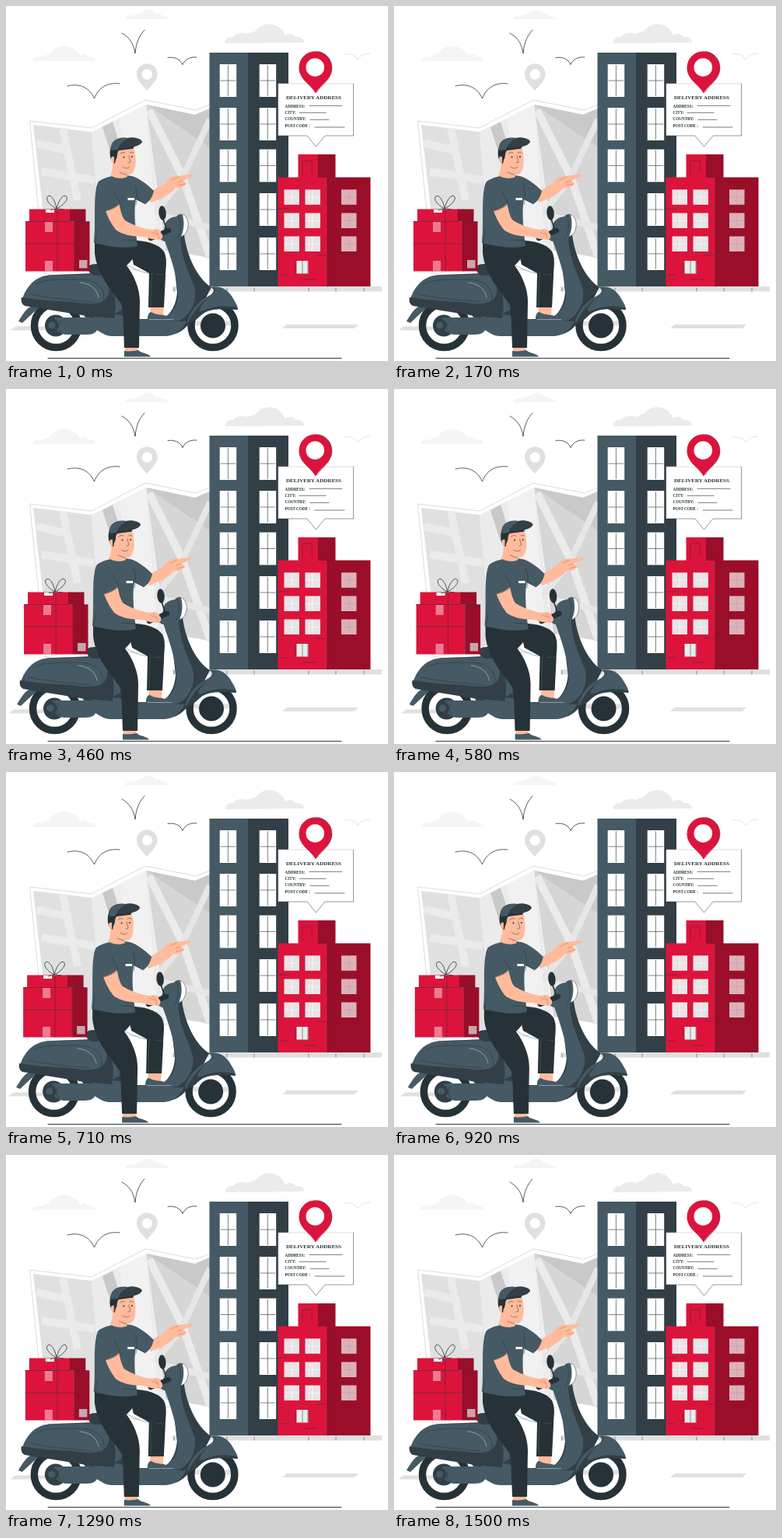
These frames come from a looping animation (491 by 457 pixels, 1.54 s). An HTML page:

```html
<!DOCTYPE html>
<html lang="en">
<head>
<meta charset="utf-8">
<title>Delivery scooter</title>
<style>
  html, body { margin: 0; width: 100%; height: 100%; overflow: hidden; background: #fff; }
  svg { display: block; width: 491px; height: 457px; }
  text { font: bold 5.15px "Liberation Serif", serif; fill: #263238; }
  .slate { fill: #455a64; }
  .deep { fill: #323f47; }
  .ink { fill: #263238; }
  .red { fill: #dc143c; }
  .wine { fill: #9a0e2a; }
  .skin { fill: #ffbb9b; }
  .white { fill: #fff; }
  .grey { fill: #e0e0e0; }
  .pale { fill: #ebebeb; }
  .faint { fill: #f5f5f5; }
  .pink { fill: #ee7a92; }
  .line { fill: none; stroke: #263238; stroke-width: .8; stroke-linecap: round; stroke-linejoin: round; }
  .thin { stroke-width: .5; }
</style>
</head>
<body>
<svg viewBox="0 0 491 457">
  <g id="sky">
    <path class="pale" d="M282 48C281 43 286 39 292 40C296 34 305 34 311 36C315 33 320 34 322 31C327 24 339 21 347 25C354 28 357 34 359 38C365 34 370 36 372 40C378 39 383 42 383 47Z"/>
    <path class="faint" d="M153 17C154 13 159 11 163 13C167 9 172 11 173 10C178 4 188 3 192 10C196 9 200 10 201 13C205 12 208 14 208 17Z"/>
    <path class="faint" d="M34 71C35 66 40 64 45 66C50 62 54 64 57 61C62 52 75 48 85 54C91 56 94 62 96 64C100 60 104 62 106 66C111 64 115 67 115 71Z"/>
    <path class="line" d="M149 35C157 39 164 47 166 61C167 47 172 37 178 31M79 103C95 99 107 105 113.500 119C119 105 130 98 146 100M208 66.500C216 65 224 68 227 75.500C230 69 236 65 245 66"/>
    <path class="line" style="stroke:#dcdcdc" d="M435 62C443 61 449 63 452 69C455 64 461 61 468 61"/>
  </g>

  <g id="map">
    <path fill="#fff" stroke="#dcdcdc" d="M30.500 148L110 157L179 121L244 134L275 122V329L231 315L170 340L110 335L50 345Z"/>
    <path class="grey" d="M35 153L110 162L125 330L56 340Z"/>
    <path class="pale" d="M110 162L180 127L205 325L125 330Z"/>
    <path fill="#d6d6d6" d="M180 127L243 140L270 128V325L205 315Z"/>
    <path fill="#c9c9c9" d="M181 127L243 140L262 132V182ZM124 156L137 149L148 184L137 197Z"/>
    <path fill="none" stroke="#ebebeb" stroke-width="10" d="M39 177L80 186M46 213L114 224M73 158L92 250M184 134L227 220L262 322"/>
    <path fill="none" stroke="#e6e6e6" stroke-width="8" d="M262 146L225 225L190 268M200 270L262 285"/>
    <path fill="#fff" opacity=".3" d="M146 144L180 127L196 325L165 330Z"/>
    <path class="grey" fill-rule="evenodd" d="M181 109.500C177 103 168 97 168 87.500A13.300 13.300 0 0 1 194.600 87.500C194.600 97 185 103 181 109.500ZM181.300 81.300a6.700 6.700 0 1 0 .1 0Z"/>
  </g>

  <g id="street">
    <path class="grey" d="M214 361H483V367.500H214ZM361 410H453L448 415H355Z"/>
    <path class="line thin" d="M284 363v4M319 363v4M389 363v4M424 363v4M460 363v4M216 363v4"/>
    <path class="line" style="stroke-width:1" d="M54 453.400H431"/>
  </g>

  <g id="tower">
    <path class="slate" d="M261.500 60H311V361H261.500Z"/>
    <path class="deep" d="M311 60H363V361H311Z"/>
  </g>

  <g id="house">
    <path class="red" d="M349.500 220.500H413V361H349.500ZM375.500 191H401V221H375.500Z"/>
    <path class="wine" d="M413 220.500H468.500V361H413ZM401 191H423.500V221H401Z"/>
    <path class="pale" d="M373.500 328H388.500V344.500H373.500Z"/>
    <path class="line thin" d="M381 217V199H393V214M413 222V361M381 328V344M388 328V344M372 331V344M350 261H363M399 321H411M352 346H361M382 352H399"/>
  </g>

  <g id="card">
    <path fill="#fff" d="M350 100H446.500V167H410L398.500 181L387 167H350Z"/>
    <path class="line thin" d="M446.500 100V167H410L398.500 181L387 167H350"/>
    <path fill="none" stroke="#c8c8c8" stroke-width=".6" d="M350 167V100H446.500"/>
    <path class="red" d="M398 112.500C392 101 376.500 95 376.500 79.500A21.200 21.200 0 0 1 419 79.500C419 95 404 101 398 112.500Z"/>
    <path class="line thin" d="M400 111C405 101 419 95 419 79.500C419 69 411 60 401 58.500"/>
    <circle class="white" cx="397.300" cy="79" r="11.800"/>
    <text x="360" y="120" style="font-size:7.050px">DELIVERY ADDRESS</text>
    <text x="358.500" y="130.700">ADDRESS:</text>
    <text x="358.500" y="138.800">CITY:</text>
    <text x="358.500" y="147">COUNTRY:</text>
    <text x="358.500" y="155.700">POST CODE :</text>
    <path class="line" style="stroke-width:.65" d="M390 128.300H432M377 137.300H411M391 146.300H415M397 156H435"/>
  </g>

  <g id="ride">
    <path class="grey" d="M12 412.500H50V417.500H6ZM238 405.500H299L298 411.500H238Z"/>

    <g id="rear-wheel">
      <circle cx="64.500" cy="411.500" r="28" fill="none" stroke="#263238" stroke-width="9.500"/>
      <circle class="deep" cx="64" cy="411.500" r="14"/>
    </g>
    <g id="front-wheel">
      <circle cx="266" cy="411.500" r="28" fill="none" stroke="#263238" stroke-width="9.500"/>
      <circle class="ink" cx="266" cy="411.500" r="16"/>
    </g>

    <g id="scooter">
      <path class="slate" d="M16 406C22 396 27 388 34 386L43 388C36 393 28 402 21 408Z"/>
      <path class="deep" d="M105 335L130 333L156 372L160 403H236V408C226 421 216 424 203 424H137C126 424 120 418 112 414L100 398L109 348Z"/>
      <path class="slate" d="M112 393L148 398L158 403.500H215L234 401C226 419 217 425 203 425H137C126 425 122 419 113 415Z"/>
      <path class="slate" d="M62 401H100C112 399 119 404 119 412C118 420 112 423 104 423H76C68 421 66 417 61 416Z"/>
      <circle class="deep" cx="59" cy="411" r="8.500"/>
      <circle class="slate" cx="59" cy="411" r="5"/>
      <path class="line thin" d="M59 406a5 5 0 1 1-1 0M71 405C66 409 67 417 72 420"/>
      <path class="slate" d="M21 377C26 361 38 348 55 346.500L113 344C136 346 147 360 149 391L138 397L22 383Z"/>
      <path class="deep" d="M106 341C103 335 108 332 116 332H140L148 346L113 347Z"/>
      <path class="deep" d="M20 375C45 379 66 380 84 381C99 383 112 385 123 381C132 376 135 366 130 356C140 365 143 379 139 402L104 399L24 386C20 384 19 379 20 375Z"/>
      <path class="line thin" d="M38 358C51 350 77 353 97 352C116 353 130 363 125 381M55 346.500L112 345M31 371C58 377 92 379 111 381"/>
      <path class="line thin" style="stroke:#dce3e6" d="M95 356C109 357 117 365 119 375"/>

      <path class="deep" d="M212 298L229 294C232 321 246 351 264 362L242 405C228 407 213 406 200 404C214 396 219 382 220 368Z"/>
      <path class="slate" d="M203 299L224 295C224 321 234 340 241 359C248 376 238 399 222 405C213 407 202 405 194 403C211 400 221 389 221 370C220 346 211 322 203 299Z"/>
      <path class="slate" d="M233 407C236 391 249 379 261 373C270 368 267 363 262 362C276 359 286 366 291 375C295 382 298 386 298 391C285 389 274 390 265 391C250 393 245 406 233 407Z"/>
      <path class="deep" d="M261 374C251 383 241 393 234 408C246 407 248 397 259 393C274 388 286 391 298 391L297 388C278 385 268 386 254 392C245 395 248 388 261 374Z"/>
      <path class="line thin" d="M265 371C272 366 270 362 264 362"/>
      <path class="white" stroke="#263238" stroke-width=".5" d="M224 268C232 268 235 277 234 284C233 291 230 295 225 297Z"/>
      <path class="slate" d="M204 285C204 276 211 272 219 271C221 268 225 267 227 269C229 277 230 287 224 299L203 303L198 300Z"/>
      <path class="line thin" d="M222 270C226 279 225 290 220 299"/>
      <path class="line" style="stroke-width:1.600" d="M201 271C203 278 205 282 206 287"/>
      <ellipse class="ink" cx="201" cy="266.500" rx="4.700" ry="9.200" transform="rotate(-5 201 266.500)"/>
    </g>

    <g id="parcels">
      <path class="red" d="M30 261.500H83V278H88V341.500H25V277H30Z"/>
      <path class="wine" d="M82 261.500H102.500V277.500H107.500V341.500H88V277.500H82Z"/>
      <path class="pink" d="M50 278H60V291H50ZM50 328H60V341H50Z"/>
      <path class="white" d="M51 262H62V266H51Z"/>
      <path fill="#c7a6ad" d="M94 327H104.500V337.500H94Z"/>
      <path class="line thin" d="M25 277.500H107M66 262V341M25 306H88M88 278V341"/>
      <path class="line" d="M65 261C57 257 51 250 53 246C56 241 63 248 65 261C68 248 75 241 78 246C80 250 73 257 65 261M64 261L57 263M67 261L74 262"/>
    </g>

    <g id="rider">
      <path class="skin" d="M186 383H203L202 398H185Z"/>
      <path class="slate" d="M182 403C182 397 184 394 187 394C194 399 203 396 207 400C211 403 216 402 217 405H183Z"/>
      <path class="line thin" style="stroke:#dce3e6" d="M184 403.500H215"/>
      <path class="ink" d="M157 302C178 301 196 306 203 316C208 326 205 337 205 348L203 388H183L184 344L164 333Z"/>
      <path class="skin" d="M153 435H170L169 447H153Z"/>
      <path class="slate" d="M152 451V444C158 445 166 444 170 443C173 447 184 447 186 451.500H152Z"/>
      <path class="ink" d="M114 304L168 307C169 318 162 328 155 334C164 346 172 363 172 380L171 440H152L150 386C134 363 117 346 114 318Z"/>
      <path class="line" style="stroke:#53636b;stroke-width:.5" d="M155 333C163 338 174 343 184 344M193 345L203 346M188 343C185 354 187 375 186 386"/>

      <path class="skin" d="M181 238L186 253C200 248 211 242 218 234C225 235 230 232 232 228L227 225L239 220C242 218 240 216 236 217L221 219C214 218 209 221 205 228L186 239Z"/>
      <path class="line thin" style="stroke:#c46b5b" d="M222 220L213 224M227 225L221 227M231 229L222 231"/>
      <path class="slate" d="M119 226C129 219 145 216 162 219C172 222 182 230 190 238C188 247 184 252 179 255L167 249C164 264 166 284 169 309C153 313 133 310 113 305C116 276 111 241 119 226Z"/>
      <path class="line thin" d="M166 231C169 239 169 247 167 256M169 249L179 255M117 289L115 304M151 301L168 302"/>
      <path class="white" d="M156.500 247H165V250H156.500Z"/>

      <path class="line" style="stroke-width:6.500" d="M186 299L209 289"/>
      <path class="skin" d="M127 261L145 253C147 262 149 272 153 276C165 283 177 287 188 288C195 285 200 289 199 292C202 294 202 297 200 300C194 302 183 299 176 297C160 297 147 293 141 288C134 279 130 270 127 261Z"/>
      <path class="line thin" style="stroke:#c46b5b" d="M191 289C196 292 197 296 196 300M187 291L195 294"/>
      <path class="slate" d="M119 226C113 236 116 250 126 264C135 262 143 258 147 253L140 236Z"/>
      <path class="line thin" d="M139 239C142 245 145 250 147 254C142 259 135 263 127 264"/>

      <path class="skin" d="M137 198C134 196 134 189 139 190L142 182H164C167 190 168 206 164 213C162 217 158 217 155 217L156 220C150 223 139 222 134 218C137 212 138 205 137 198Z"/>
      <path class="ink" d="M135 181L164 179C165 182 164 184 160 184L145 186C142 189 144 194 141 198L140 203C134 201 132 190 135 181Z"/>
      <path class="skin" d="M139 194C134 192 133 200 139 202Z"/>
      <path class="deep" d="M135 184C134 174 144 168 156 170C164 168 175 171 175 175C172 181 161 182 149 183Z"/>
      <path class="slate" d="M136 179C137 172 147 168 158 171C152 173 146 178 144 185L135 186Z"/>
      <path class="line thin" d="M158 171C152 173 147 177 145 184M147 190Q150 187 153 189M159 189Q162 187 164 189M158 193L160 201L157 202M150 207C154 210 157 209 159 207M146 214C150 216 153 217 155 217"/>
      <circle class="ink" cx="151.500" cy="194.500" r="1"/>
      <circle class="ink" cx="162" cy="194" r="1"/>
    </g>
  </g>
</svg>
<script>
  const ns = 'http://www.w3.org/2000/svg';
  const byId = id => document.getElementById(id);

  function addPath(group, d, attrs) {
    const path = document.createElementNS(ns, 'path');
    path.setAttribute('d', d);
    for (const name in attrs) path.setAttribute(name, attrs[name]);
    byId(group).append(path);
  }

  function addWindow(group, x, y, w, h, fill, bars) {
    const cx = x + w / 2, cy = y + h / 2;
    addPath(group, `M${x} ${y}h${w}v${h}h${-w}Z`, { fill });
    addPath(group, `M${cx} ${y + 1}v${h - 2}M${x + 1} ${cy}h${w - 2}`,
      { fill: 'none', stroke: bars, 'stroke-width': .6 });
  }

  for (const y of [75, 131, 184.5, 241, 298])
    for (const x of [274.7, 325.7]) addWindow('tower', x, y, 21.5, 42, '#fff', '#263238');
  for (const y of [236.3, 266.5, 296.5])
    for (const x of [357.5, 384.5, 431])
      addWindow('house', x, y, 19.5, 19.5, x > 400 ? '#ddb1ba' : '#e9e3e5', x > 400 ? '#c8949f' : '#fff');

  // Horizontal rattle: linear segments between ten equally spaced offsets.
  const offsets = [0, -1, 2, -4, 4, -4, 4, -4, 2, -1];
  const scale = .97, startPhase = .017, cycle = 1500, loop = 1540, fps = 24;

  function shake(phase) {
    const p = phase % 1 * 10, i = Math.floor(p);
    const from = offsets[i], to = offsets[(i + 1) % 10];
    return scale * (from + (to - from) * (p - i));
  }

  function draw() {
    const step = Math.min(36, Math.floor((performance.now() % loop + 3.4) * fps / 1000));
    const x = shake(startPhase + step * 1000 / fps / cycle) - shake(startPhase);
    byId('ride').setAttribute('transform', `translate(${x.toFixed(3)} 0)`);
    requestAnimationFrame(draw);
  }
  draw();
</script>
</body>
</html>
```
